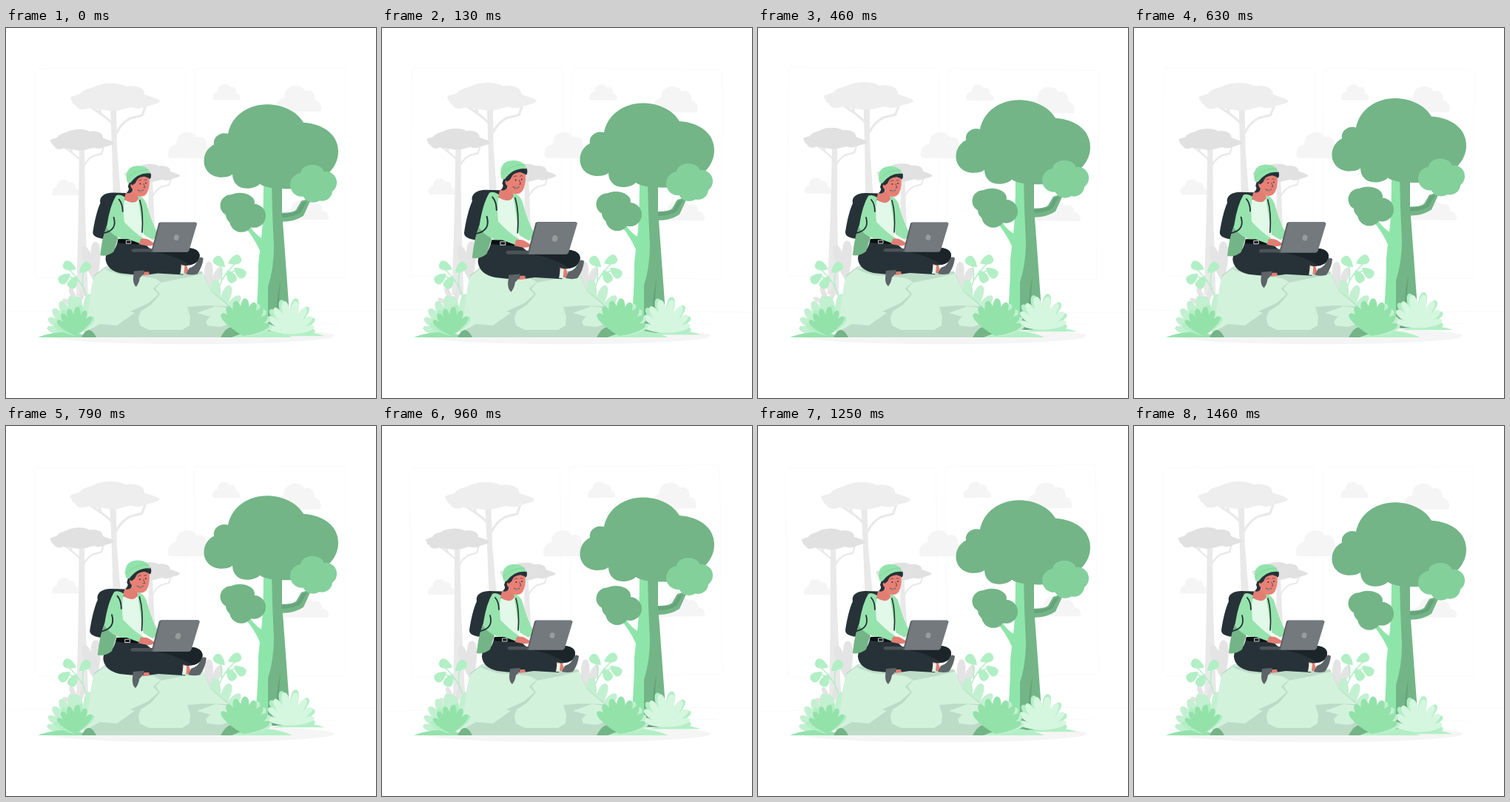
An HTML page that plays this animation: 500 px wide and 500 px high, repeating every 1500 ms.

```html
<!DOCTYPE html>
<html lang="en">
<head>
<meta charset="utf-8">
<title>Working outdoors</title>
<style>
html, body { margin: 0; width: 100%; height: 100%; overflow: hidden; background: #fff; }
svg { display: block; width: 100%; height: 100%; }
.line { fill: none; stroke-linecap: round; stroke-linejoin: round; }
</style>
</head>
<body>
<svg viewBox="0 0 500 500">
  <defs>
    <path id="cloud" fill="#f5f5f5" d="M1 35C-4 28 1 17 10 16C10 5 17 0 26 0C33 0 36 4 38 7C46 4 52 10 51 19C58 20 62 28 59 35Z"/>
    <g id="acacia">
      <path class="line" stroke="#e9e9e9" stroke-width="3.200" d="M58 56Q51 47 26 31M41 41l-2-8M62 67Q69 53 81 47L97 43 101 32"/>
      <path d="M0 21C-1 16 8 17 13 14C17 7 29 7 35 3C45-1 65-2 75 4C85 2 101 5 100 15C107 18 119 20 121 24C121 27 109 29 103 31C97 34 89 35 83 32C73 34 63 38 53 37C43 35 35 35 25 33C17 37 9 35 7 29C1 27 4 24 0 21Z"/>
    </g>
  </defs>

  <g id="backdrop">
    <g class="line" stroke="#f4f4f4" stroke-width=".5">
      <rect x="39" y="55" width="203.500" height="282.500" rx="4"/>
      <rect x="255" y="55" width="203.500" height="282.500" rx="4"/>
      <path d="M0 382.400H500M417 398.500h33"/>
    </g>
    <use href="#cloud" transform="translate(280 76) scale(.61)"/>
    <use href="#cloud" transform="translate(366 78)"/>
    <use href="#cloud" transform="translate(220 141)"/>
    <use href="#cloud" transform="translate(63 205) scale(.6)"/>
    <use href="#cloud" transform="translate(376 232) scale(1 .77)"/>
    <path fill="#e9e9e9" d="M141 111h8l1 50 6 76h-11l-2-76ZM99 160h7l1 90 4 112H95l3-112ZM193 205h5l3 62h-9Z"/>
    <use href="#acacia" fill="#eeeeee" transform="translate(87 75)"/>
    <use href="#acacia" fill="#e1e1e1" transform="translate(60 137) scale(.71 .77)"/>
    <use href="#acacia" fill="#e1e1e1" transform="translate(160 184) scale(.62 .65)"/>
    <g id="greyLeaves"></g>
  </g>

  <ellipse cx="250" cy="416" rx="193.900" ry="11.300" fill="#f5f5f5"/>
  <g id="backPlants"></g>

  <g id="tree">
    <path fill="#8ee5aa" d="M348 208H364L365 320 357 414H335Q341 370 341 320L343 301Q336 285 323 269L329 268Q337 279 345 284Q348 260 348 208Z"/>
    <path fill="#73b587" d="M359 208H373V250Q388 250 392 246L399 234 413 230 402 254Q390 262 374 262L385 414H354V350Q362 325 362 296L360 250Z"/>
    <path fill="#67a37a" d="M371 340L366 414H360Q366 390 367 362ZM373 251Q389 251 394 247L400 236 407 234 398 250Q388 256 373 256Z"/>
    <path fill="#73b587" d="M300 143C305 118 328 103.500 352 103.500C375 103.500 394 114 402 128C430 130 449 145 449 167C449 186 436 199 420 208C408 215 392 218 375 217.500C362 217 350 216 343 211C339 215 332 217 325 217C313 217 306 208 306 198C302 201 297 202 291 202C277 202 267.500 192 267.500 180C267.500 169 274 161 281 158C279 149 288 140 300 143Z"/>
    <g fill="#73b587">
      <ellipse cx="316" cy="236" rx="20" ry="13"/><circle cx="304" cy="240" r="14.500"/>
      <circle cx="335" cy="254" r="16"/><circle cx="318" cy="260" r="16"/><circle cx="311" cy="252" r="14"/>
    </g>
    <g fill="#83d09b">
      <ellipse cx="414" cy="197" rx="16" ry="12"/><circle cx="400" cy="212" r="16"/>
      <circle cx="432" cy="209" r="15"/><circle cx="427" cy="220" r="14"/><circle cx="415" cy="221" r="15"/>
    </g>
    <g id="bush"></g>
  </g>

  <path fill="#bddcc7" d="M105 418L109 397 113 366 119 334 135 322 265 329 277 355 303 376 308 405 303 418Z"/>
  <g fill="#d3f2dc">
    <path d="M119 336L136 323 196 336 209 343 199 352 206 360 192 372 168 383 174 385 150 402 127 400 107 411 109 397 113 366Z"/>
    <path d="M209 344L240 338 266 332 277 356 301 376 268 375 245 377 249 390 248 402 238 408H193L181 402 179 392 182 383 196 374 208 360 202 352Z"/>
    <path d="M258 385L283 376 303 378 306 398 290 404 272 402 270 396 276 390Z"/>
  </g>
  <path fill="#bddcc7" d="M132 325Q150 335 173 335L210 339 244 334 210 326Z"/>

  <g id="person">
    <path fill="#263238" d="M128 237C126 228 134 223 145 223L163 223.500C169 226 167 232 164 238L143 286C128 285 118 283 118 276C120 262 124 245 128 237Z"/>
    <path fill="#e2f8e8" d="M157 233L181 230 186 260 184 286H153Z"/>
    <path fill="#97e3ad" d="M178 227Q186 228 190 238Q196 262 206 279L198 286 186 279Z"/>
    <path class="line" stroke="#263238" stroke-width="1.600" d="M181 233Q186 250 184 276"/>
    <path fill="#263238" d="M152 285H184Q190 296 197 299L240 297Q259 296 261 306Q262 319 241 321L239 333 205 331Q185 335 156 331Q137 327 135 312Q135 305 139 303Q148 304 152 285Z"/>
    <path fill="#1b2529" d="M200 302L240 297Q259 296 261 306Q262 317 248 320Q232 308 200 302Z"/>
    <path fill="#e17d73" d="M236 319L244 321 247 331H236ZM187 329l6 0 1 4-9 1Z"/>
    <path fill="#e2f8e8" d="M237 320L241 321 240 332 235 332Z"/>
    <path fill="#5c6468" d="M243 332L247 324Q256 322 260 311Q263 308 266 311Q265 322 258 332Q251 334 243 332ZM173 328L187 327Q186 333 181 337Q180 344 176 349Q172 346 172 338Z"/>
    <path fill="#e17d73" d="M162 224L177 219 179 231Q176 237 170 236Q163 235 160 231Z"/>
    <path fill="#97e3ad" d="M149 227Q153 224 161 229Q158 242 160 262Q174 277 186 284L181 292Q164 289 151 282L142 303Q135 307 128 307Q130 285 137 266Q141 240 149 227Z"/>
    <path fill="#74b587" d="M136 269Q142 278 152 283L146 302Q137 309 128 307Q130 285 136 269Z"/>
    <path fill="#0b1013" d="M152 285H165L184 292Q168 292 151 290Z"/>
    <path class="line" stroke="#fff" stroke-width=".8" d="M163 287h6v4h-6z"/>
    <path class="line" stroke="#263238" stroke-width="1.800" d="M153 232Q158 238 158 248M146 256Q151 273 133 277"/>
    <path fill="#e17d73" d="M182 285Q190 283 196 288L201 291Q198 295 190 294L180 292Z"/>
    <path fill="#4b5357" d="M170 299Q171 298 174 298H200L245 301 244 302.500H172Q169 302 170 299Z"/>
    <path fill="#596063" d="M206 264Q207 262.500 209 262.500H256L244 302.500H196Z"/>
    <path fill="#73797c" d="M208 264Q209 263 210 263H256Q258 263 257.500 265L247 300Q246 302.500 244 302.500H198Z"/>
    <ellipse cx="230" cy="283" rx="3.400" ry="4" transform="rotate(15 230 283)" fill="#979b9d"/>
    <path fill="#263238" d="M167 208L191 196Q196 198 195 204L180 208Q173 210 171 221Q167 225 163 223Q168 219 165 215Z"/>
    <path fill="#e98075" d="M174 207Q182 200 193 201Q195 211 192 220Q189 229 181 228Q173 227 171 218Q167 214 170 210Q172 208 174 211Z"/>
    <path fill="#263238" d="M168 210Q172 200 182 196L195 196Q197 200 195 204Q189 202 185 200Q178 202 175 210L171 213Z"/>
    <path fill="#92e3ab" d="M164 209C161 195 166 188 176 187C186 186 193 190 195 197Q179 195 168 210Z"/>
    <path class="line" stroke="#76c58e" stroke-width=".5" d="M164 204Q176 191 193 192"/>
    <g fill="#263238"><circle cx="181.500" cy="211" r=".9"/><circle cx="189" cy="210" r=".9"/></g>
    <path class="line" stroke="#263238" stroke-width=".6" d="M179 207q2-2 4-1M187 206q2-1 3 0M186 211l2 5-2 0"/>
    <path fill="#fff" stroke="#263238" stroke-width=".5" d="M178 219Q182 222 186 219Q183 224 178 219Z"/>
  </g>

  <g id="frontPlants"></g>
</svg>
<script>
const PERIOD = 1500, START = 12;
const WHITE = '#d5f6df', PALE = '#c3f0d0', LIGHT = '#b2efc5', MID = '#93e2aa', DARK = '#73b587', GREY = '#e4e4e4';
const byId = id => document.getElementById(id);
const add = (id, markup) => byId(id).insertAdjacentHTML('beforeend', markup);

const leaf = (id, x, y, fill, angle, len, w = len * .13) => add(id,
  `<path transform="translate(${x} ${y}) rotate(${angle})" fill="${fill}"
    d="M0 0C${w} ${-len * .4} ${w * 1.4} ${-len} 0 ${-len}C${-w * 1.4} ${-len} ${-w} ${-len * .4} 0 0Z"/>`);

// Evenly spread leaves, shorter the further they lean.
const fan = (id, x, y, fill, from, to, count, len) => {
  for (let i = 0; i < count; i++) {
    const angle = from + (to - from) * i / (count - 1);
    leaf(id, x, y, fill, angle, len * (1 - Math.abs(angle) / 260));
  }
};
const mound = (id, x1, x2, y, h, fill) => add(id,
  `<path fill="${fill}" d="M${x1} ${y}Q${(x1 + x2) / 2} ${y - 2 * h} ${x2} ${y}Z"/>`);

// A bent stem with broad leaves; side is 1 or -1 for its direction.
const sprig = (x, y, side) => {
  add('backPlants', `<g id="sprig${side}" transform="translate(${x} ${y}) scale(${side} 1)">
    <path class="line" stroke="${LIGHT}" stroke-width="1.500" d="M0 0Q3-22 13-36Q20-46 30-54M8-29Q10-46 4-54M13-36L26-42"/></g>`);
  [[17, -52, 66], [13, -47, -48], [16, -43, 150], [25, -46, 128]]
    .forEach(([lx, ly, angle]) => leaf('sprig' + side, lx, ly, LIGHT, angle, 19, 7));
};

fan('greyLeaves', 121, 345, GREY, -18, 0, 2, 56);
fan('greyLeaves', 98, 378, GREY, -62, 15, 3, 32);
fan('greyLeaves', 272, 365, GREY, 3, 24, 2, 50);

sprig(112, 378, -1);
sprig(283, 370, 1);
fan('backPlants', 107, 412, PALE, -14, 6, 2, 54);
fan('backPlants', 283, 400, PALE, 0, 62, 4, 60);

fan('bush', 384, 413, LIGHT, -40, 84, 6, 50);
mound('bush', 362, 431, 416.500, 6, LIGHT);
fan('bush', 384, 414, WHITE, -72, 72, 8, 47);

fan('frontPlants', 94, 416, PALE, -74, -6, 5, 56);
mound('frontPlants', 43, 115, 418, 7, MID);
fan('frontPlants', 94, 416, LIGHT, -62, 45, 4, 43);
fan('frontPlants', 94, 416, MID, -50, 40, 6, 40);
mound('frontPlants', 102, 122, 418, 10, DARK);

mound('frontPlants', 290, 320, 418, 14, DARK);
mound('frontPlants', 305, 387, 418, 9, LIGHT);
fan('frontPlants', 325, 416, PALE, 20, 68, 4, 50);
fan('frontPlants', 321, 416, MID, -45, 66, 8, 51);

const triangle = p => Math.asin(Math.sin(2 * Math.PI * p)) * 2 / Math.PI;
const bump = (p, peak, rise, fall) => Math.max(0, 1 - (p < peak ? (peak - p) / rise : (p - peak) / fall));

function draw(now) {
  const p = ((now + START) % PERIOD) / PERIOD;
  const beat = 1 + .1 * (bump(p, .1, .1, .2) + bump(p, .5, .1, .1));
  const move = (id, value) => byId(id).setAttribute('transform', value);
  move('backdrop', `rotate(${triangle(p)} 250 250)`);
  move('tree', `translate(0 ${-10 * bump(p, .5, .5, .5)})`);
  move('person', `translate(191.500 268) scale(${beat}) translate(-191.500 -268)`);
  requestAnimationFrame(draw);
}
draw(performance.now());
</script>
</body>
</html>
```
